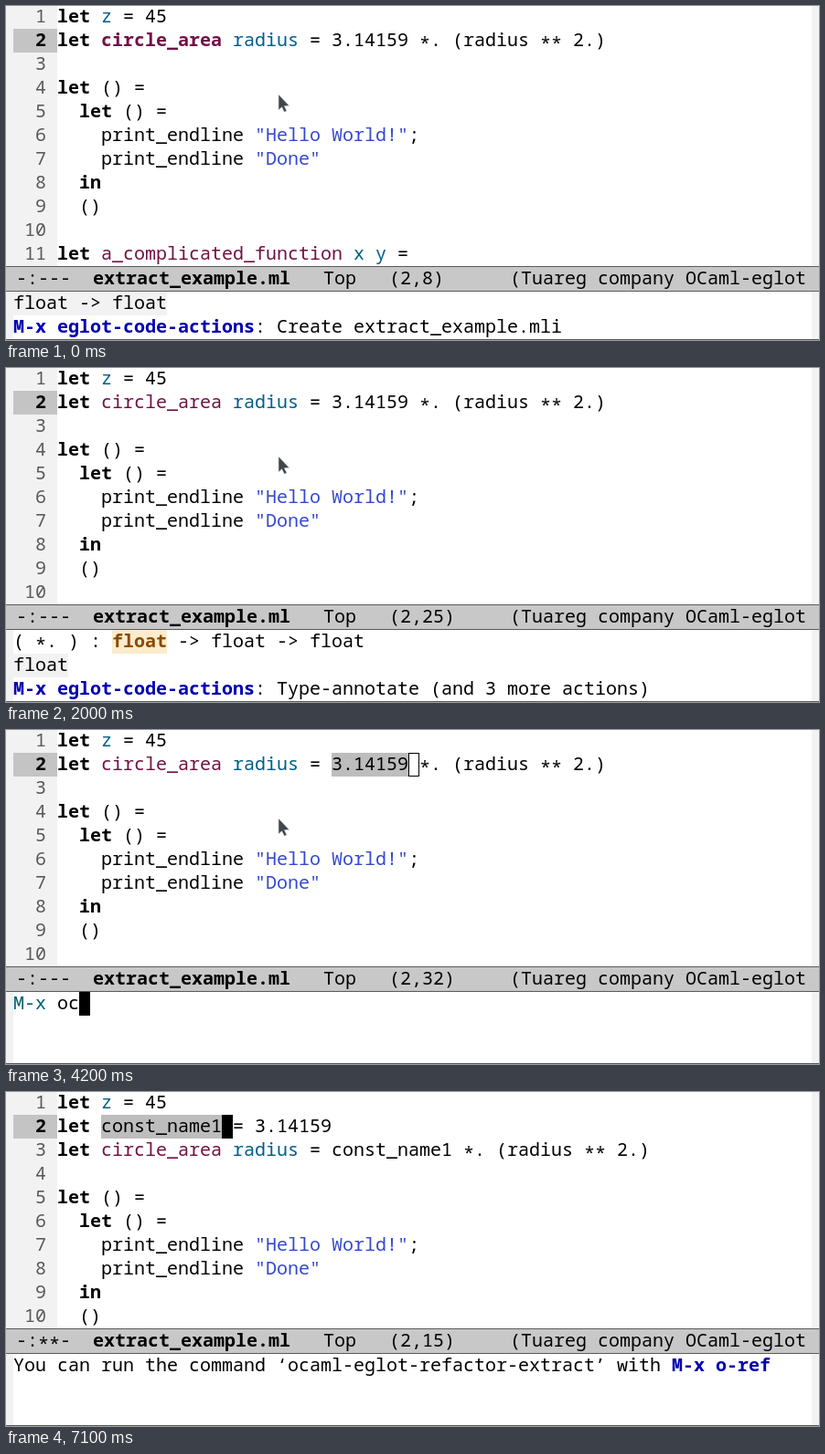
Animation, 889 px wide and 366 px high, one loop 8 s. Source, as an HTML page:

```html
<!DOCTYPE html>
<html lang="en">
<head>
<meta charset="utf-8">
<title>Extracting a constant</title>
<style>
html, body { margin: 0; width: 100%; height: 100%; overflow: hidden; background: #fff; }
svg { display: block; }
text { font: 20px "Noto Sans Mono", "DejaVu Sans Mono", monospace; white-space: pre; }
.k, .F, .b, .n { font-weight: 700; }
.f, .F { fill: #721045; }
.v { fill: #005e8b; }
.s { fill: #3548cf; }
.b { fill: #0000b0; }
.p { fill: #005f6f; }
.l { fill: #595959; }
.a { fill: #884900; font-weight: 700; }
.w { fill: #fff; }
</style>
</head>
<body>
<svg id="stage" width="889" height="366" viewBox="0 0 889 366"></svg>
<script>
const stage = document.getElementById("stage");
const CELL = 12, ROW = 26, LEFT = 8, CODE = 56, LOOP = 8000;
const COMMAND = "ocaml-eglot-refactor-extract";
const backdrop = { d: "#f2f2f2", a: "#fbeccb" };

const actions = "{b M-x eglot-code-actions}: ";
const body = [
  "", "{k let} () =", "  {k let} () =",
  '    print_endline {s "Hello World!"};', '    print_endline {s "Done"}',
  "  {k in}", "  ()", "", "{k let} {f a_complicated_function} {v x} {v y} =", ""
];

// Each step changes only the listed properties from its time on.
const steps = [
  [0, { col: 8, cursor: "off", bold: true, region: null, input: null, edited: false,
        echo: ["{d float -> float}", actions + "Create extract_example.mli"] }],
  [400, { cursor: "on" }],
  [800, { col: 10 }], [900, { col: 15 }], [1100, { col: 22 }],
  [1300, { col: 23 }], [1400, { col: 24 }], [1500, { col: 25 }],
  [2000, { cursor: "off", bold: false,
           echo: ["( *. ) : {a float} -> float -> float", "{d float}",
                  actions + "Type-annotate (and 3 more actions)"] }],
  [2100, { cursor: "on", echo: ["Mark set"] }],
  [2400, { col: 26, region: 25, echo: [""] }],
  [2700, { col: 32 }],
  [3200, { cursor: "box", input: 0, caret: true, echo: ["", "", ""] }],
  [3700, { caret: false }],
  [4200, { input: 2, caret: true }], [4400, { input: 4 }], [4500, { input: 5 }],
  ...Array.from({ length: 7 }, (_, i) => [4700 + i * 100, { input: 6 + i }]),
  [5700, { input: 13 }], [5800, { input: 14 }], [6000, { input: 15 }],
  [6300, { input: COMMAND.length }],
  [6800, { caret: false }],
  [6900, { input: null }],
  [7100, { edited: true, region: 4, col: 15, cursor: "on",
           echo: [`You can run the command ‘${COMMAND}’ with {b M-x o-ref}`, "", ""] }]
];

const rect = (x, y, w, h, fill) =>
  `<rect x="${x}" y="${y}" width="${w}" height="${h}" fill="${fill}"/>`;

// Plain run of cells; asterisks sit at mid height.
function run(x, y, str, cls = "") {
  let out = "";
  for (const part of str.match(/\*|[^*]+/g) || []) {
    if (part.trim())
      out += `<text class="${cls}" x="${x}" y="${y + (part === "*" ? 23 : 19)}">${part.replace(/>/g, "&gt;")}</text>`;
    x += part.length * CELL;
  }
  return out;
}

// Text with {class words} markup.
function rich(x, y, str) {
  let out = "";
  for (const [whole, cls, words] of str.matchAll(/\{(\w) ([^}]*)\}|[^{]+/g)) {
    const part = words ?? whole, width = part.length * CELL;
    if (backdrop[cls]) out += rect(x, y, width, ROW, backdrop[cls]);
    out += run(x, y, part, cls);
    x += width;
  }
  return out;
}

function block(x, y, char = " ") {
  return rect(x, y, CELL, ROW, "#000") + run(x, y, char, "w");
}

function codeLines(s) {
  const head = `{k let} {${s.bold ? "F" : "f"} circle_area} {v radius} = `;
  const tail = " *. (radius ** 2.)";
  return ["{k let} {v z} = 45",
    ...(s.edited ? ["{k let} const_name1 = 3.14159", head + "const_name1" + tail]
                 : [head + "3.14159" + tail]),
    ...body];
}

function buffer(s, modeY) {
  const lines = codeLines(s), y = ROW - 1, x = CODE + s.col * CELL;
  let out = rect(0, 0, CODE, modeY, "#f2f2f2") + rect(LEFT, y, CODE - LEFT, ROW, "#c4c4c4");
  if (s.region !== null)
    out += rect(CODE + s.region * CELL, y, (s.col - s.region) * CELL, ROW, "#bdbdbd");
  lines.slice(0, Math.floor((modeY + 1) / ROW)).forEach((line, i) => {
    const top = i * ROW - 1;
    out += run(20, top, String(i + 1).padStart(2), i === 1 ? "n" : "l") + rich(CODE, top, line);
  });
  if (s.cursor === "on") {
    const plain = lines[1].replace(/\{\w |\}/g, "");
    out += block(x, y, plain[s.col]);
  }
  if (s.cursor === "box")
    out += `<rect x="${x + .5}" y="${y + .5}" width="${CELL - 1}" height="${ROW - 1}" fill="#fff" stroke="#000"/>`;
  if (!s.edited)
    out += '<path d="M298 97V114L301.6 110.8L304.4 116.2L307 114.9L304.4 109.7L309.6 109.2Z" fill="#41464c" stroke="#d8d8d8" stroke-width=".6"/>';
  return out;
}

function modeLine(s, y) {
  const place = `(2,${s.col})`.padEnd(11);
  return rect(0, y, 889, 28, "#5a5a5a") + rect(0, y + 1, 889, 26, "#c8c8c8") +
    rich(11, y + 1, `-:${s.edited ? "**-" : "---"}  {k extract_example.ml}   Top   ${place}(Tuareg company OCaml-eglot`);
}

function echoArea(s, y) {
  let out = rect(0, y, LEFT, 365 - y, "#f2f2f2");
  s.echo.forEach((line, i) => out += rich(LEFT, y + i * ROW, line));
  if (s.input !== null && !s.edited) {
    out += rich(LEFT, y, "{p M-x} " + COMMAND.slice(0, s.input));
    if (s.caret) out += block(CODE + s.input * CELL, y);
  }
  return out;
}

function render(s) {
  const modeY = 337 - s.echo.length * ROW;
  stage.innerHTML = rect(0, 0, 889, 366, "#fff") + rect(881, 0, 8, 365, "#f2f2f2") +
    buffer(s, modeY) + modeLine(s, modeY) + echoArea(s, modeY + 28) +
    rect(0, 365, 889, 1, "#5a5a5a");
}

let shown = -1;
const start = performance.now();
function tick() {
  const t = (performance.now() - start) % LOOP;
  const past = steps.filter(([at]) => at <= t);
  if (past.length !== shown) {
    shown = past.length;
    render(Object.assign({}, ...past.map(([, change]) => change)));
  }
  requestAnimationFrame(tick);
}
tick();
</script>
</body>
</html>
```
